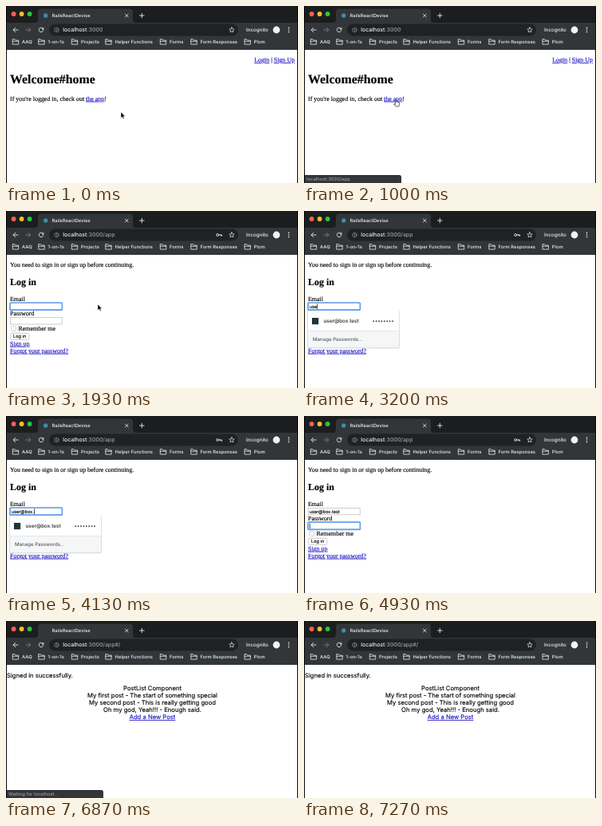
An HTML page for the animation above (7730 ms loop, 366 by 222 pixels).

```html
<!DOCTYPE html>
<html lang="en">
<head>
<meta charset="utf-8">
<title>Sign-in walkthrough</title>
<style>
  html, body { margin: 0; width: 100%; height: 100%; overflow: hidden; background: #fff; }
  svg { display: block; width: 366px; height: 222px; }
  text { white-space: pre; text-rendering: geometricPrecision; }
  .ui { font-family: Inter, "Open Sans", sans-serif; font-size: 5.85px; font-weight: 500; fill: #f1f3f4; }
  .serif { font-family: "Liberation Serif", "Times New Roman", serif; font-size: 7.95px; }
  .field { font-family: Inter, sans-serif; font-size: 5.6px; }
  .app { font-family: Inter, sans-serif; font-size: 7.65px; }
  .serif text, .app text { fill: #000; stroke: #000; stroke-width: .14; }
  .serif .link, .app .link { fill: #1b10c0; stroke: #1b10c0; text-decoration: underline; }
  .line { fill: none; stroke: #e8eaed; stroke-width: .9; stroke-linecap: round; }
  .dim { fill: #9aa0a6; }
  .box { fill: #fff; stroke: #b8b8b8; stroke-width: .7; }
  .ring { fill: none; stroke: #64a0f0; stroke-width: 1.7; }
</style>
</head>
<body>
<svg viewBox="0 0 366 222">
  <rect width="366" height="222" fill="#fff"/>

  <g id="home" class="serif">
    <text x="362" y="70" text-anchor="end"><tspan class="link">Login</tspan> | <tspan class="link">Sign Up</tspan></text>
    <text x="5" y="97" font-weight="bold" style="font-size:15.9px">Welcome#home</text>
    <text x="5" y="118.6">If you're logged in, check out <tspan class="link">the app</tspan>!</text>
  </g>

  <g id="login" class="serif">
    <text x="5" y="70">You need to sign in or sign up before continuing.</text>
    <text x="5" y="93" font-weight="bold" style="font-size:11.95px">Log in</text>
    <text x="5" y="113">Email</text>
    <rect class="box" x="5.4" y="115.4" width="64.8" height="8.4"/>
    <text x="5" y="131.3">Password</text>
    <rect class="box" x="5.4" y="133.6" width="64.8" height="8.4"/>
    <rect class="box" x="6.6" y="144.8" width="5.8" height="5.8" rx="1"/>
    <text x="15.5" y="150">Remember me</text>
    <rect class="box" x="5.4" y="153.3" width="23.4" height="8" rx="1.5"/>
    <text class="field" x="9" y="159.3">Log in</text>
    <text class="link" x="5" y="168.8">Sign up</text>
    <text class="link" x="5" y="177.7">Forgot your password?</text>
    <rect id="ring" class="ring" x="5" width="65.4" height="9.2" rx="1"/>
    <text id="email" class="field" x="6.7" y="121.7"></text>
    <g id="dots"></g>
    <rect id="caret" width=".7" height="6.6"/>
  </g>

  <g id="suggest">
    <rect x="4.4" y="125" width="115.2" height="47.2" rx="1.5" fill="#000" opacity=".22"/>
    <rect x="5" y="125" width="114" height="46.3" rx="1" fill="#fff"/>
    <path d="M5 150.8H119V171.3H5Z" fill="#f5f6f7"/>
    <path d="M5 150.6H119" stroke="#dadce0" stroke-width=".7"/>
    <rect x="10" y="134" width="8.2" height="8.2" fill="#22343c"/>
    <text class="ui" x="24.5" y="140.2" style="font-size:6.35px;fill:#202124">user@box.test</text>
    <g id="hiddenWord"></g>
    <text class="ui" x="11" y="163.3" style="font-size:6.1px;fill:#55595e">Manage Passwords...</text>
  </g>

  <g class="app">
    <text id="flash" x="1" y="70.5">Signed in successfully.</text>
    <g id="posts" text-anchor="middle">
      <text x="183.5" y="87">PostList Component</text>
      <text x="183.5" y="96">My first post - The start of something special</text>
      <text x="183.5" y="105">My second post - This is really getting good</text>
      <text x="183.5" y="114">Oh my god, Yeah!!! - Enough said.</text>
      <text x="183.5" y="123" class="link">Add a New Post</text>
    </g>
  </g>

  <g id="status">
    <path d="M0 212H119.5Q122 212 122 214.5V222H0Z" fill="#323639"/>
    <text id="statusText" class="ui dim" x="3" y="219.3"></text>
  </g>

  <g id="chrome" class="ui">
    <rect width="366" height="55" fill="#323639"/>
    <path d="M0 0H366V21H163Q159 21 159 17V7.5Q159 3.5 155 3.5H44Q40 3.5 40 7.5V17Q40 21 36 21H0Z" fill="#1c1d1f"/>
    <circle cx="9.6" cy="10" r="2.9" fill="#ff5f57"/>
    <circle cx="19.6" cy="10" r="2.9" fill="#febc2e"/>
    <circle cx="29.6" cy="10" r="2.9" fill="#28c840"/>
    <circle id="favicon" cx="49.7" cy="12" r="2.7" fill="#3f8ca5"/>
    <path id="spinner" class="line" d="M0-3.2A3.2 3.2 0 0 1 3.2 0"/>
    <text x="57.6" y="14.1">RailsReactDevise</text>
    <path class="line" d="M149.5 10.2l3.6 3.6m0-3.6l-3.6 3.6M167.5 12h5.6m-2.8-2.8v5.6"/>
    <rect x="54" y="22.5" width="237" height="15" rx="7.5" fill="#202124"/>
    <path class="line" d="M15 30H9.2m2.6-2.7L9.1 30l2.7 2.7"/>
    <path class="line" style="stroke:#7d8186" d="M25 30h5.8m-2.6-2.7l2.7 2.7-2.7 2.7"/>
    <g id="reload">
      <path class="line" d="M46.3 28.2A2.8 2.8 0 1 0 46.8 30.6"/>
      <path d="M47.3 26.8V29.6H44.5Z"/>
    </g>
    <path id="stop" class="line" d="M41.5 27.5l5 5m0-5l-5 5"/>
    <g class="line" style="stroke:#9aa0a6;stroke-width:.7">
      <circle cx="63.5" cy="30" r="2.7"/>
      <path d="M63.5 29.7v1.7M63.5 28.4v.1"/>
    </g>
    <text x="71.3" y="32.3" style="font-size:6.95px">localhost<tspan id="path" class="dim"></tspan></text>
    <g id="key" class="line">
      <circle cx="265.2" cy="30" r="1.5"/>
      <path d="M267 30h3.6v1.3m-1.4-1.3v1"/>
    </g>
    <path class="line" style="stroke-width:.7" transform="translate(283 30)" d="M0-3.3.9-1.1 3.2-.9 1.5.7 2 2.9 0 1.7-2 2.9-1.5.7-3.2-.9-.9-1.1Z"/>
    <text x="301" y="32.2" style="font-size:6.25px">Incognito</text>
    <circle cx="339" cy="30" r="4.4"/>
    <circle cx="354.5" cy="27.4" r=".8"/>
    <circle cx="354.5" cy="30" r=".8"/>
    <circle cx="354.5" cy="32.6" r=".8"/>
    <g id="bookmarks"></g>
  </g>

  <path d="M.5 0V222M365.5 0V222" stroke="#08090a"/>
  <path id="arrow" d="M0 0V7.6L1.8 6 3 8.7 4.2 8.2 3 5.6H5.4Z" stroke="#fff" stroke-width=".5"/>
  <path id="hand" transform="translate(112 117)" fill="#fff" stroke="#222" stroke-width=".7" stroke-linejoin="round"
    d="M2.6 5.5V1Q3.3 0 4 1V3.6Q5-.2 5.2 3.7 6.3 3.2 6.4 4.1 7.6 3.8 7.6 5V6.7L6.8 9H3.2L.6 5.9Q.7 4.6 2.6 6.5Z"/>
</svg>
<script>
const LOOP = 7730;
const STEP = 1000 / 15;
const EMAIL = 'user@box.test';
const emailKeys = [2870, 3000, 3200, 3270, 3600, 3870, 3930, 4070, 4130, 4270, 4470, 4530, 4730];
const passwordKeys = [5130, 5270, 5330, 5470, 5730, 5870, 6000, 6130];
const bookmarks = [['AAQ', 20], ['1-on-1s', 52.5], ['Projects', 94], ['Helper Functions', 136.5],
  ['Forms', 205], ['Form Responses', 243.5], ['Plom', 310.7]];

const $ = id => document.getElementById(id);
const show = (id, on) => { $(id).style.display = on ? '' : 'none'; };
const clamp = v => Math.max(0, Math.min(1, v));
const ease = v => v * v * (3 - 2 * v);
const mix = (a, b, v) => a + (b - a) * v;
const typed = (keys, t) => keys.filter(k => t >= k).length;
const bullets = (x, y, pitch, r, color) => Array.from({ length: 8 }, (_, i) =>
  `<circle cx="${x + i * pitch}" cy="${y}" r="${r}" fill="${color}"/>`).join('');

$('bookmarks').innerHTML = bookmarks.map(([label, x]) =>
  `<path class="line" style="stroke-width:.8" transform="translate(${x - 11.7} 41.9)" d="M0 0V6.2H7.4V1.2H3.8L2.8 0ZM0 2.3H7.4"/>
   <text x="${x}" y="47.3">${label}</text>`).join('');
$('dots').innerHTML = bullets(8, 138, 2.85, 1, '#111');
$('hiddenWord').innerHTML = bullets(87.2, 138.2, 3.4, 0.95, '#444');

function drawPage(t) {
  const onLogin = t >= 1470 && t < 6670;
  const onPassword = t >= 4930;
  show('home', t < 1470);
  show('login', onLogin);
  show('suggest', t >= 3200 && t < 4930);
  show('flash', t >= 6670);
  show('posts', t >= 6800);
  if (!onLogin) return;

  const dotCount = typed(passwordKeys, t);
  $('email').textContent = EMAIL.slice(0, typed(emailKeys, t));
  [...$('dots').children].forEach((dot, i) => dot.setAttribute('visibility', i < dotCount ? 'visible' : 'hidden'));
  $('ring').setAttribute('y', onPassword ? 133.2 : 115);
  const textWidth = onPassword ? dotCount * 2.85 : $('email').getComputedTextLength();
  show('caret', t >= 2530);
  $('caret').setAttribute('x', 6.9 + textWidth);
  $('caret').setAttribute('y', onPassword ? 134.6 : 116.4);
}

function drawBrowser(t, tick) {
  const loading = (t >= 1070 && t < 1730) || (t >= 6330 && t < 6870);
  show('stop', loading);
  show('reload', !loading);
  show('key', t >= 1730 && t < 6670);
  show('favicon', t < 6330 || t >= 7070);
  show('spinner', t >= 6400 && t < 6870);
  $('spinner').setAttribute('transform', `translate(50 12) rotate(${-tick * .6})`);
  $('path').textContent = ':3000' + (t < 1200 ? '' : t < 6800 ? '/app' : '/app#/');

  const fadeOut = start => 1 - clamp((tick - start + STEP) / (4 * STEP));
  const opacity = t < 1700 ? clamp((tick - 800) / 200) : t < 6330 ? fadeOut(1733) : fadeOut(7067);
  $('status').setAttribute('opacity', opacity);
  $('statusText').textContent = t < 1200 ? 'localhost:3000/app' : 'Waiting for localhost...';
}

function drawPointer(t, tick) {
  const onLink = t >= 730 && t < 1530;
  const toLink = ease(clamp((tick - STEP) / (10 * STEP)));
  const toField = ease(clamp((tick - 32 * STEP) / (6 * STEP)));
  const x = mix(mix(144, 115, toLink), 84, toField);
  const y = mix(mix(133, 117, toLink), 120, toField);
  show('hand', onLink);
  show('arrow', !onLink && t < 2870);
  $('arrow').setAttribute('transform', `translate(${x} ${y})`);
}

function frame() {
  const t = performance.now() % LOOP;
  const tick = Math.floor((t + 4) / STEP) * STEP;
  drawPage(t);
  drawBrowser(t, tick);
  drawPointer(t, tick);
  requestAnimationFrame(frame);
}
frame();
</script>
</body>
</html>
```
